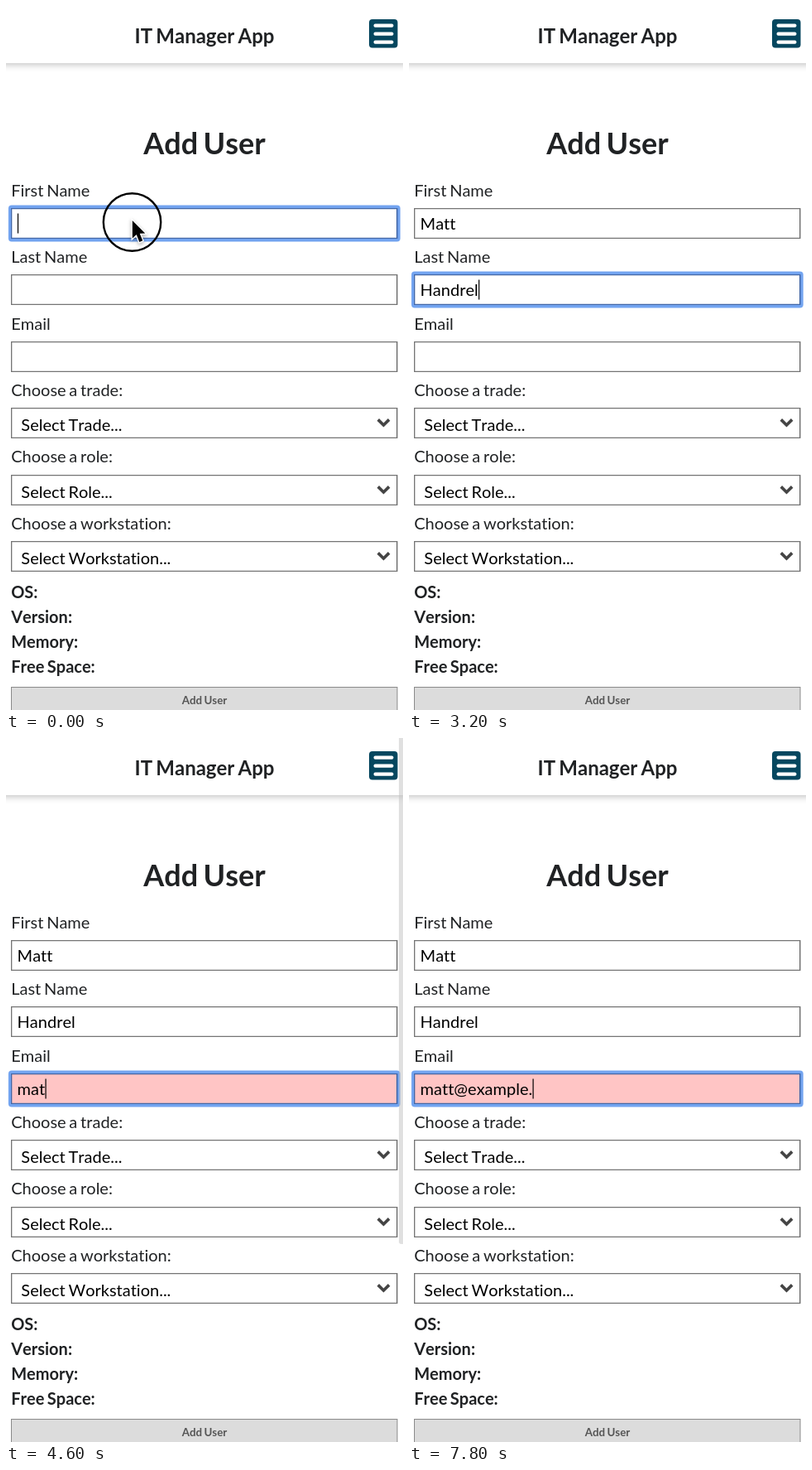
Animation of 480 by 850 pixels, one loop 8 s. Source, as an HTML page with a canvas:

```html
<!DOCTYPE html>
<html lang="en">
<head>
<meta charset="utf-8">
<title>Add User</title>
<style>
  html, body { margin: 0; width: 100%; height: 100%; overflow: hidden; background: #fff; }
  canvas { display: block; }
</style>
</head>
<body>
<canvas id="stage" width="480" height="850"></canvas>
<script>
const ctx = document.getElementById('stage').getContext('2d');
const LOOP = 8000, STEP = 200;
const INK = '#202224', BORDER = '#747474';
const ROW = 80.45;
const TEXT_X = 13.6;

// Each field: when it takes the focus, its text, and the time of each keystroke.
const fields = [
  { label: 'First Name', focus: 0, text: 'Matt', keys: [400, 600, 800, 1000] },
  { label: 'Last Name', focus: 1400, text: 'Handrel',
    keys: [1600, 1800, 2000, 2200, 2400, 2600, 2800] },
  { label: 'Email', focus: 3600, text: 'matt@example.', validate: true,
    keys: [4000, 4200, 4500, 4750, 5800, 6000, 6100, 6250, 7000, 7200, 7400, 7600, 7800] },
];
const selects = [
  ['Choose a trade:', 'Select Trade...'],
  ['Choose a role:', 'Select Role...'],
  ['Choose a workstation:', 'Select Workstation...'],
];
const specs = ['OS:', 'Version:', 'Memory:', 'Free Space:'];

const labelY = row => Math.round(229.65 + row * ROW);
const boxY = row => Math.round(244 + row * ROW);

function write(text, x, y, { size = 20, weight = 400, color = INK, align = 'left' } = {}) {
  ctx.font = `${weight} ${size}px Lato, sans-serif`;
  ctx.fontKerning = 'none';
  ctx.letterSpacing = '0.001px'; // any letter spacing switches ligatures off
  ctx.wordSpacing = `${-0.07 * size}px`;
  ctx.fillStyle = color;
  ctx.textAlign = align;
  ctx.fillText(text, x, y);
}

function roundRect(x, y, w, h, r, color) {
  ctx.fillStyle = color;
  ctx.beginPath();
  ctx.roundRect(x, y, w, h, r);
  ctx.fill();
}

function strokePath(points, color, width) {
  ctx.strokeStyle = color;
  ctx.lineWidth = width;
  ctx.beginPath();
  points.forEach(([x, y]) => ctx.lineTo(x, y));
  ctx.stroke();
}

function box(y, fill = '#fff', border = BORDER) {
  roundRect(6, y, 467.5, 37, 0, border);
  roundRect(7.3, y + 1.3, 464.7, 34.4, 0, fill);
}

function drawField(field, row, t) {
  const y = boxY(row);
  const next = fields[row + 1];
  const focused = t >= field.focus && (!next || t < next.focus);
  const typed = field.keys.filter(key => key <= t).length;
  const text = field.text.slice(0, typed);

  write(field.label, 6.2, labelY(row));
  if (focused) roundRect(2.9, y - 3.5, 473.8, 44, 4, '#73a4f0');
  box(y, field.validate && typed ? '#ffc5c5' : '#fff', focused ? '#4367a6' : BORDER);
  write(text, TEXT_X, y + 26, { color: '#000' });

  const lastKey = typed ? field.keys[typed - 1] : field.focus;
  if (focused && (t - lastKey) % 1000 < 500) {
    ctx.fillRect(TEXT_X + ctx.measureText(text).width + 0.3, y + 6.5, 1.2, 24);
  }
}

function drawSelect([label, value], index) {
  const row = index + fields.length;
  const y = boxY(row);
  write(label, 6.2, labelY(row));
  box(y);
  write(value, 18.3, y + 28, { color: '#000' });
  ctx.lineCap = 'butt';
  ctx.lineJoin = 'miter';
  strokePath([[449.8, y + 14.4], [456.5, y + 21], [463.2, y + 14.4]], '#444', 3.6);
}

function drawHeader() {
  ctx.save();
  ctx.shadowColor = 'rgba(0,0,0,.24)';
  ctx.shadowBlur = 8;
  ctx.shadowOffsetY = 2;
  roundRect(-10, -10, 500, 79, 0, '#fff');
  ctx.restore();
  write('IT Manager App', 240, 45, { size: 24, weight: 700, align: 'center' });
  roundRect(439, 16, 34.5, 34.5, 4, '#06475f');
  for (const y of [21.5, 31.5, 41.5]) roundRect(444.5, y, 24, 4.2, 2, '#fff');
}

function drawPointer(t) {
  if (t >= 400) return;
  if (t < 200) {
    ctx.strokeStyle = '#000';
    ctx.lineWidth = 2.4;
    ctx.beginPath();
    ctx.arc(152.5, 261, 34.7, 0, 2 * Math.PI);
    ctx.stroke();
  }
  ctx.save();
  ctx.beginPath();
  [[152.8, 259], [152.8, 280.5], [157.7, 276], [161.3, 285], [165.3, 283.3],
   [161.7, 274.7], [168.3, 274.5]].forEach(([x, y]) => ctx.lineTo(x, y));
  ctx.closePath();
  ctx.shadowColor = 'rgba(0,0,0,.35)';
  ctx.shadowBlur = 4;
  ctx.shadowOffsetY = 2;
  ctx.lineJoin = 'miter';
  ctx.lineWidth = 2.6;
  ctx.strokeStyle = '#fff';
  ctx.stroke();
  ctx.restore();
  ctx.fillStyle = '#000';
  ctx.fill();
}

function drawScrollbar(t) {
  if (t < 3800 || t >= 4800) return;
  ctx.globalAlpha = t < 4600 ? 1 : 0.5;
  roundRect(475, -6, 8, 617, 3, '#c2c2c2');
  ctx.globalAlpha = 1;
}

function draw(now) {
  const t = Math.floor((now % LOOP) / STEP) * STEP;
  ctx.fillStyle = '#fff';
  ctx.fillRect(0, 0, 480, 850);
  drawHeader();
  write('Add User', 240, 179, { size: 36, weight: 700, align: 'center' });
  fields.forEach((field, row) => drawField(field, row, t));
  selects.forEach(drawSelect);
  specs.forEach((name, i) => write(name, 6.2, 715 + i * 30, { weight: 700 }));
  roundRect(6, 822, 467.5, 37, 0, '#8a8a8a');
  roundRect(7, 823, 465.5, 35, 0, '#dcdcdc');
  write('Add User', 240, 843, { size: 13.333, weight: 700, color: '#555', align: 'center' });
  drawPointer(t);
  drawScrollbar(t);
}

let start;
function frame(now) {
  start ??= now;
  draw(now - start);
  requestAnimationFrame(frame);
}
requestAnimationFrame(frame);
</script>
</body>
</html>
```
